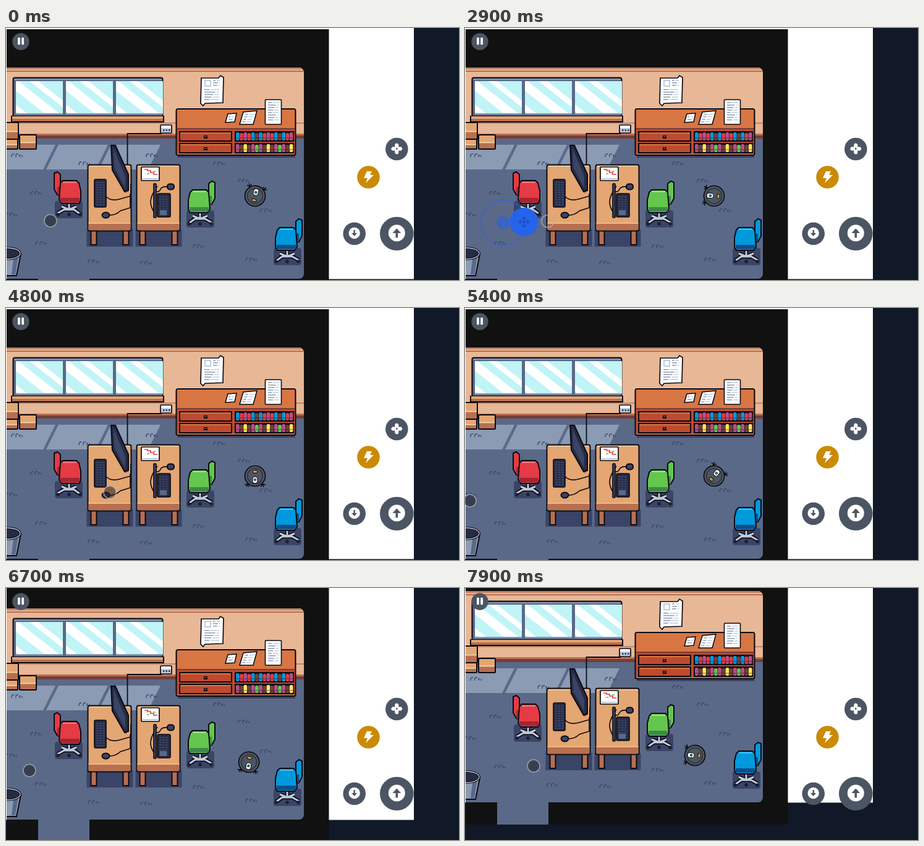
Animation of 733x408 px, one loop 8 s. Source, as an HTML page with a canvas:

```html
<!DOCTYPE html>
<html>
<head>
<meta charset="utf-8">
<style>
html, body { margin: 0; width: 733px; height: 408px; overflow: hidden; background: #111827; }
canvas { display: block; }
</style>
</head>
<body>
<canvas id="stage" width="733" height="408"></canvas>
<script>
const LOOP = 8000, STEP = 100, TAU = Math.PI * 2;
const INK = '#0b0a12', NAVY = '#262b44', DUSK = '#3a4466', SLATE = '#5a6988', STEEL = '#8b9bb4', MIST = '#c0cbdc';
const SAND = '#e8b796', CLAY = '#c28569', RUST = '#b86f50', WOOD = '#e4a672', CREAM = '#ead4aa';
const BRICK = '#be4a2f', ORANGE = '#d77643', BROWN = '#733e39', GRAY = '#4b5563', BLUE = '#2563eb';

const stage = document.getElementById('stage').getContext('2d');
const page = document.createElement('canvas');
page.width = 733;
page.height = 444;
let g = page.getContext('2d');

// Drawing helpers
const rect = (c, x, y, w, h) => { g.fillStyle = c; g.fillRect(x, y, w, h); };
const paint = (fill, stroke, width = 2) => {
  if (fill) { g.fillStyle = fill; g.fill(); }
  if (stroke) { g.strokeStyle = stroke; g.lineWidth = width; g.stroke(); }
};
const poly = (pts, fill, stroke, width) => {
  g.beginPath();
  for (let i = 0; i < pts.length; i += 2) g.lineTo(pts[i], pts[i + 1]);
  g.closePath();
  paint(fill, stroke, width);
};
const round = (x, y, w, h, r, fill, stroke, width) => {
  g.beginPath();
  g.roundRect(x, y, w, h, r);
  paint(fill, stroke, width);
};
const oval = (x, y, rx, ry, fill, stroke, width) => {
  g.beginPath();
  g.ellipse(x, y, rx, ry, 0, 0, TAU);
  paint(fill, stroke, width);
};
const disc = (x, y, r, fill, stroke, width) => oval(x, y, r, r, fill, stroke, width);
const path = (d, stroke, width = 2) => {
  g.strokeStyle = stroke;
  g.lineWidth = width;
  g.stroke(new Path2D(d));
};
const at = (x, y, draw, angle = 0, flip = 1) => {
  g.save();
  g.translate(x, y);
  g.rotate(angle);
  g.scale(flip, 1);
  draw();
  g.restore();
};

function drawWall() {
  rect(SAND, 1, 64, 481, 115);
  rect(CLAY, 1, 64, 481, 3);
  rect(RUST, 1, 69, 481, 2);
  rect(CLAY, 1, 153, 481, 2);
  rect(RUST, 1, 171, 481, 3);
  rect(BROWN, 1, 174, 481, 5);
}

function drawWindow() {
  round(11.5, 80.5, 242, 65, 3, SLATE, INK);
  rect(STEEL, 13, 82, 239, 2);
  for (let i = 0; i < 3; i++) {
    const x = 16 + i * 81;
    g.save();
    g.beginPath();
    g.rect(x, 86, 76, 52);
    g.clip();
    rect('#c0f4f7', x, 86, 76, 52);
    for (let k = 0; k < 3; k++) {
      const left = x - 62 + k * 42, w = k === 1 ? 24 : 14;
      poly([left, 86, left + w, 86, left + w + 66, 138, left + 66, 138], '#fff');
    }
    g.restore();
    rect(STEEL, x, 138, 76, 2);
  }
  rect(INK, 8, 142, 248, 11);
  rect(WOOD, 10, 143, 244, 4);
  rect(RUST, 10, 147, 244, 4);
}

function drawTuft(x, y) {
  at(x, y, () => path('M-8 3v-3l2-2h2M-1 3v-4l2-1h2M5 3v-3h2M9 3v-3', DUSK, 1.3));
}

function drawFloor() {
  rect(SLATE, 1, 179, 481, 228);
  rect(SLATE, 52, 404, 83, 38);
  for (let x = 0; x < 180; x += 85) poly([x, 189, x + 80, 189, x + 60, 229, x - 20, 229], STEEL);
  for (let i = 0; i < 5; i++) {
    drawTuft(17 + 109 * i, 206 + 13 * (i % 2));
    drawTuft(56 + 85 * i, 348 + 35 * Math.abs(Math.sin(i)));
  }
  for (let i = 0; i < 2; i++) {
    drawTuft(48 + 336 * i, 267 - 20 * i);
    drawTuft(8 + 412 * i, 302 - 7 * i);
  }
}

function drawBox(x, y, w, h) {
  round(x, y, w, h, 1, RUST, INK);
  rect(WOOD, x + 1, y + 1, w - 2, h * .55);
  rect(CREAM, x + 1, y + h * .5, w - 2, 1.5);
}

function drawLines(x, y, w, count, gap) {
  for (let i = 0; i < count; i++) {
    const part = w * (.35 + i * 7 % 4 * .13);
    rect(STEEL, x, y + i * gap, part, 1.5);
    rect(MIST, x + part + 2, y + i * gap, w - part - 2, 1.5);
  }
}

function drawPoster() {
  poly([316, 81, 344, 81, 347, 77, 352, 80, 351, 121, 322, 122, 319, 126, 315, 122], '#fff', INK, 1.7);
  rect(MIST, 321, 84, 11, 11);
  rect('#fff', 323, 86, 7, 7);
  drawLines(335, 84, 11, 3, 4);
  drawLines(321, 99, 24, 5, 4);
}

function drawCabinet() {
  rect(DUSK, 278, 205, 190, 5);
  round(275.5, 131, 193, 75, 3, BRICK, INK);
  rect(ORANGE, 277, 132, 190, 30);
  rect(BROWN, 277, 162, 190, 2);
  rect(RUST, 277, 203, 190, 2);
  const colors = ['#0099db', '#63c74d', '#b55088', '#e43b44', '#fee761', BROWN];
  for (let row = 0; row < 2; row++) {
    const y = 167 + row * 19;
    rect(INK, 280, y, 86, 17);
    rect(BRICK, 282, y + 2, 82, 13);
    rect(ORANGE, 282, y + 2, 82, 2);
    rect(INK, 320, y + 7, 6, 5);
    rect(BROWN, 321, y + 8, 4, 2);
    rect(INK, 370, y, 96, 17);
    for (let i = 0; i < 15; i++) {
      const c = colors[(i * i + i * 2 + row * 2) % 6], x = 372 + i * 6.2;
      round(x, y + 2 + i % 2, 5.7, 13 - i % 2, 2, c);
      rect('rgba(24,20,37,.3)', x, y + 10, 5.7, 2);
    }
  }
  poly([359, 139, 373, 138, 370, 152, 355, 153], '#fff', INK, 1.6);
  drawLines(360, 143, 9, 2, 4);
  poly([384, 136, 406, 134, 400, 156, 378, 156], '#fff', INK, 1.6);
  for (let i = 0; i < 4; i++) drawLines(387 - i * 1.5, 139 + i * 4, 14, 1, 0);
  round(419.500, 116, 26, 40, 1, '#fff', INK, 1.6);
  drawLines(424, 120, 17, 8, 4);
}

function drawRouter() {
  path('M252 171H196.500V226', INK, 1.8);
  round(250, 157, 18, 13, 1, MIST, INK, 1.7);
  rect('#fff', 251, 158, 16, 4);
  for (let x = 254; x < 265; x += 4.5) rect(DUSK, x, 164, 2.5, 3);
}

function drawDesk(x) {
  rect(DUSK, x - 2, 326, 75, 28);
  for (const leg of [5, 57]) {
    rect(INK, x + leg - 1, 328, 11, 24);
    rect(RUST, x + leg + 1, 328, 7, 22);
  }
  round(x, 221.5, 70, 107, 3, WOOD, INK);
  rect(CREAM, x + 2, 223, 66, 1.5);
  rect(RUST, x + 1, 317, 68, 10);
  rect('#f0b985', x + 1, 315, 68, 2);
}

function drawKeys(x, y, w, h) {
  round(x, y, w, h, 2, NAVY, INK, 1.6);
  for (let j = 4; j < h - 3; j += 4)
    for (let i = 3; i < w - 3; i += 5) rect(DUSK, x + i, y + j, 3.6, 2.4);
}

function drawLeftDesk() {
  drawDesk(132.5);
  path('M162 273q8 8 22 4l18-5v-20M168 303q10 0 17-7l16-5V268', INK, 1.6);
  poly([176, 230, 188, 238, 193, 250, 182, 246], NAVY, INK);
  poly([186, 251, 199, 246, 199, 262, 194, 268], RUST);
  poly([170, 190, 177, 190, 198, 237, 198, 263, 192, 265, 172, 230], NAVY, INK);
  poly([174, 195, 193, 240, 193, 259, 175, 226], DUSK);
  drawKeys(143, 245, 19, 45);
  oval(161.5, 303, 6, 4.5, DUSK, INK);
}

function drawRightDesk() {
  drawDesk(211.5);
  round(219, 225, 29, 22, 1, '#fff', INK, 1.7);
  rect(MIST, 221, 243, 25, 2);
  path('M224 229h5v2h5v3h5v3h6', '#e43b44', 1.7);
  path('M228 236h4M238 232h4', '#63c74d', 1.7);
  path('M262 257q-10-1-12 4t-8 4M245 256q-10 14-11 24t9 23', INK, 1.6);
  round(239, 252, 4, 55, 1, DUSK, INK, 1.6);
  drawKeys(245, 268, 21, 38);
  rect(SLATE, 249, 295, 11, 8);
  round(261, 252.5, 11, 9, 4, DUSK, INK);
}

function drawChair(x, y, color, shade, light, flip) {
  const base = 'M22 50V60M4 68L14 61H30L41 67M10 56L22 61L34 56';
  at(x, y, () => {
    round(0, 47, 45, 28, 4, DUSK);
    path(base, INK, 6.5);
    path(base, MIST, 3);
    for (let i = 4; i < 42; i += 18) disc(i, 69, 2.2, NAVY, INK, 1);
    poly([36, 4, 41, 0, 46, 2, 46, 28, 41, 37, 36, 38], color, INK);
    rect(shade, 37, 24, 4, 13);
    poly([6, 18, 10, 14, 32, 14, 36, 18, 38, 45, 34, 51, 6, 51, 3, 46, 3, 30], color, INK);
    rect(light, 10, 16, 22, 2);
    rect(shade, 5, 42, 31, 7);
  }, 0, flip ? -1 : 1);
}

function drawBin() {
  poly([-4, 366, 24, 366, 17, 401, -4, 401], STEEL, INK);
  poly([12, 374, 20, 370, 15, 399, 9, 399], SLATE);
  oval(2, 365, 21, 9, NAVY, INK, 3.5);
  oval(2, 365, 21, 9, null, MIST, 1.3);
}

function drawPage() {
  rect('#fff', 0, 0, 660, 406.5);
  rect('#111', 1, 2, 521.5, 440);
  g.save();
  g.beginPath();
  g.roundRect(1, 64, 481, 342, [0, 8, 8, 0]);
  g.rect(52, 400, 83, 42);
  g.clip();
  drawFloor();
  drawWall();
  drawWindow();
  drawBox(-4, 153, 24, 27);
  drawBox(-4, 180, 23, 16);
  drawBox(22, 173, 27, 23);
  drawPoster();
  drawCabinet();
  drawRouter();
  drawChair(124, 233, '#e43b44', '#a22633', '#f6757a', true);
  drawLeftDesk();
  drawRightDesk();
  drawChair(292, 248, '#63c74d', '#3e8948', '#9be08a');
  drawChair(433, 309, '#0099db', '#124e89', '#3cc0f0');
  drawBin();
  g.restore();
}

function drawRobot(x, y, heading) {
  at(x, y, () => {
    for (const side of [-1, 1]) at(13, side * 12, () => path('M-3 0H5M0 0L3-4M0 0L3 4', INK, 1.5), side * .4);
    disc(0, 0, 16.5, '#555b68', INK, 1.7);
    disc(0, 0, 12.5, GRAY, '#2b303b', 1.6);
    round(-9, -3.5, 4, 7, 1, '#d9a441', INK, 1);
    round(1, -4, 11, 8, 4, '#fff', INK, 1);
    disc(6, 0, 1.8, '#2d8f83', INK, .8);
  }, heading * Math.PI / 180);
}

function drawJoystick(bx, by, kx, ky) {
  disc(bx, by, 36.5, null, 'rgba(37,99,235,.5)', 1.8);
  disc(bx, by, 9, 'rgba(37,99,235,.55)', BLUE, 1.5);
  disc(kx, ky, 23, BLUE);
  for (let i = 0; i < 4; i++) at(kx, ky, () => path('M0 0V-8M-3-5L0-8L3-5', '#1d4fc4', 1.8), i * TAU / 4);
}

function drawArrowButton(x, r, inner, dir) {
  disc(x, 333, r, GRAY);
  disc(x, 332, inner, '#fff');
  at(x, 332, () => {
    g.scale(inner / 9, inner / 9);
    poly([-1.2, -5, 1.2, -5, 1.2, 0, 4.5, 0, 0, 5, -4.5, 0, -1.2, 0], GRAY);
  }, dir > 0 ? 0 : Math.PI);
}

function drawButtons() {
  disc(24, 22, 13.7, GRAY);
  round(19, 15.5, 3.8, 11.5, 1, '#fff');
  round(25.2, 15.5, 3.8, 11.5, 1, '#fff');

  disc(632.3, 196, 18.3, GRAY);
  for (let i = 0; i < 4; i++) at(632.3, 195.5, () => {
    g.fillStyle = '#fff';
    g.fill(new Path2D('M-3 1V-7Q-2-9 0-9Q4-8 3-4L2 1Z'));
  }, i * TAU / 4);
  disc(632.3, 195.5, 1.4, GRAY);

  disc(586.5, 241.5, 18.3, '#ca8a04');
  poly([584, 232, 592, 232, 589, 238, 595, 238, 582, 251, 585, 243, 579, 243], '#fff');

  drawArrowButton(563.7, 18.3, 9.2, 1);
  drawArrowButton(632.3, 27.3, 13.5, -1);
}

// Each drag steers the robot: start, end, from x, y, to x, y, degrees turned
const drags = [
  [0, 0, 72, 312, 72, 312, 0],
  [100, 900, 80, 310, 170, 307, 177],
  [1200, 1850, 184, 305, 99, 306, -115],
  [2200, 3500, 62, 315, 158, 312, 372],
  [3800, 4500, 105, 316, 185, 270, 93],
  [5000, 5400, 164, 305, 8, 312, -140],
  [5500, 6250, 110, 301, 3, 308, -213],
  [7300, 7850, 59, 288, 111, 288, 87]
];

const mix = (a, b, p) => a + (b - a) * p;
const progress = (t, a, b) => b > a ? Math.min(1, Math.max(0, (t - a) / (b - a))) : 1;
const easeOut = p => Math.sin(p * Math.PI / 2);

function pointerAt(t) {
  const i = drags.findLastIndex(d => t >= d[0]);
  const [a, b, x0, y0, x1, y1] = drags[i], next = drags[i + 1];
  if (t < b || !next) {
    const p = easeOut(progress(t, a, b));
    return { x: mix(x0, x1, p), y: mix(y0, y1, p), bx: x0, by: y0, down: t < b };
  }
  const p = easeOut(progress(t, b, next[0]));
  return { x: mix(x1, next[2], p), y: mix(y1, next[3], p), down: false };
}

function drawFrame(now) {
  const t = Math.floor(now % LOOP / STEP) * STEP;
  const { x, y, bx, by, down } = pointerAt(t);
  const scroll = 59 * easeOut(progress(t, 6400, 7250));
  const drive = easeOut(progress(t, 6300, 7100)), glide = progress(t, 7400, 7900);
  const heading = drags.reduce((sum, d) => sum + d[6] * progress(t, d[0], d[1]), -77);

  rect('#111827', 0, 0, 733, 408);
  g.drawImage(page, 0, -Math.round(scroll));
  drawRobot(403 - 14 * drive - 17 * glide, 272 + 58 * drive - scroll, heading);
  drawButtons();
  if (down) {
    // The knob trails the pointer and stops at the ring
    const dx = x - bx, dy = y - by, d = Math.hypot(dx, dy) || 1;
    const k = Math.min(37, Math.max(0, d * .8 - 24)) / d;
    drawJoystick(bx, by, bx + dx * k, by + dy * k);
  }
  disc(x, y, 10, down ? null : 'rgba(28,28,34,.55)', 'rgba(175,178,182,.75)', 1.6);
  requestAnimationFrame(() => drawFrame(performance.now() - start));
}

drawPage();
g = stage;
const start = performance.now();
drawFrame(0);
</script>
</body>
</html>
```
